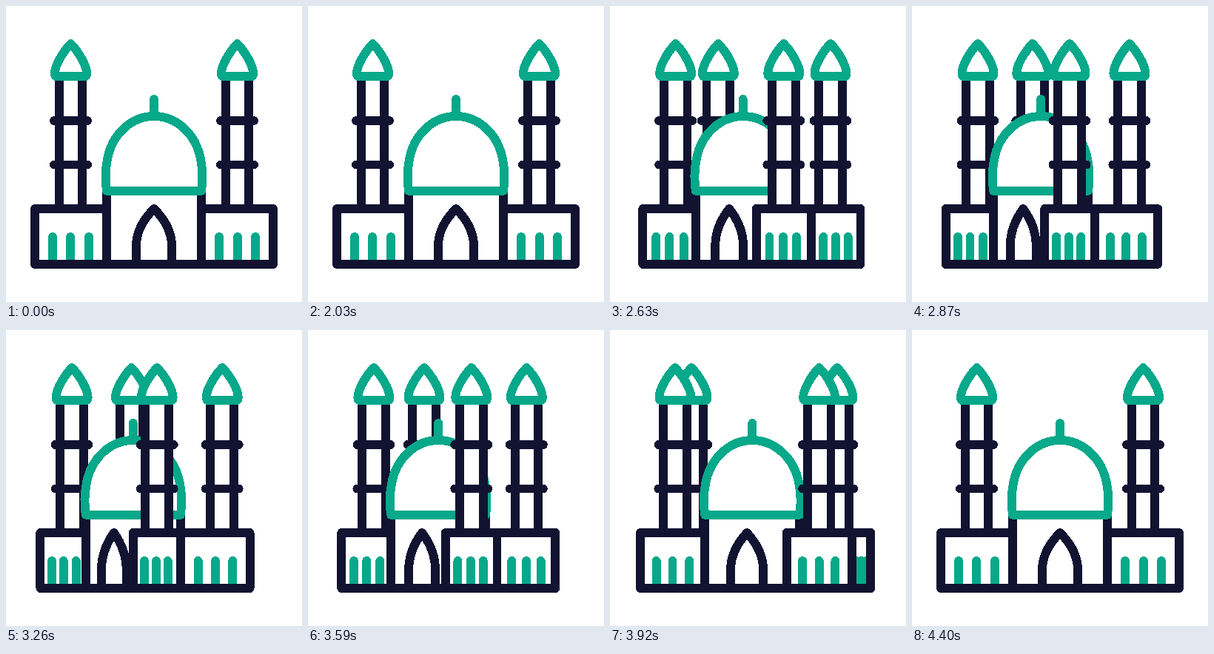
These frames come from a looping animation (400 px wide and 400 px high, 4.43 s). An HTML page:

```html
<!DOCTYPE html>
<html lang="en">
<head>
<meta charset="utf-8">
<title>Turning mosque</title>
<style>
html, body { margin: 0; width: 100%; height: 100%; overflow: hidden; background: #fff; }
svg { display: block; width: 100vw; height: 100vh; shape-rendering: crispEdges; }
path { stroke-width: 11.9; stroke-linecap: round; stroke-linejoin: round; fill: none; }
.dark { stroke: #121331; }
.green { stroke: #08a88a; }
.solid { fill: #fff; }
.blank { fill: #fff; stroke: none; }
</style>
</head>
<body>
<svg id="stage" viewBox="0 0 400 400"></svg>
<script>
const LOOP = 4430, START = 2030, HALF = 1185, STEP = 30, PEAK = 108.5;
const NS = "http://www.w3.org/2000/svg";
const stage = document.getElementById("stage");

function add(parent, tag, attrs) {
  const el = document.createElementNS(NS, tag);
  for (const k in attrs) el.setAttribute(k, attrs[k]);
  parent.appendChild(el);
  return el;
}
const path = (parent, cls, d = "") => add(parent, "path", { class: cls, d });
const move = (el, x) => el.setAttribute("transform", `translate(${x.toFixed(2)} 0)`);
const draw = (el, d) => el.setAttribute("d", d);

// Towers are built around x = 0
function tower() {
  const g = add(stage, "g", {});
  path(g, "blank", "M-15.8 95H15.8V274H-15.8Z");
  path(g, "dark", "M-15.8 97V274M15.8 97V274M-22.5 155H22.5M-22.5 214.5H22.5");
  path(g, "green solid", "M0 51C-10 61 -21.5 80 -21.5 91Q-21.5 95 -19.5 95H19.5Q21.5 95 21.5 91C21.5 80 10 61 0 51Z");
  return g;
}

function block() {
  const fill = path(stage, "blank"), bars = path(stage, "green"), frame = path(stage, "dark");
  return (left, right, xs) => {
    const box = `M${left} 274H${right}V349H${left}Z`;
    draw(fill, box);
    draw(bars, xs.map(x => `M${x} 312V349`).join(""));
    draw(frame, box);
  };
}

const backLeft = tower(), backRight = tower(), frontLeft = tower();

const hall = add(stage, "g", {});
path(hall, "blank", "M-64 250H64V349H-64Z");
path(hall, "dark", "M-64 250V349M64 250V349");
path(hall, "green", "M0 126V147");
path(hall, "green solid", "M-64 249.7C-65.8 238 -65.8 222 -63.2 208C-57 173 -30.5 149 0 149C30.5 149 57 173 63.2 208C65.8 222 65.8 238 64 249.7Z");

const sideBlock = block();
const frontRight = tower();
const leftBlock = block(), rightBlock = block();
const base = path(stage, "dark"), door = path(stage, "dark");

function bezier(a, b, x) {
  let lo = 0, hi = 1;
  for (let i = 0; i < 30; i++) {
    const u = (lo + hi) / 2, v = 1 - u;
    if (3 * a * u * v * v + 3 * b * u * u * v + u * u * u < x) lo = u; else hi = u;
  }
  return lo * lo * (3 - 2 * lo);
}

function turn(ms) {
  if (ms < START) return 0;
  const t = Math.floor((ms - START) / STEP) * STEP;
  if (t <= 0 || t >= 2 * HALF) return 0;
  return PEAK * (t < HALF
    ? bezier(0.322, 0.352, t / HALF)
    : 1 - bezier(0.583, 0.4, t / HALF - 1));
}

function render(ms) {
  const p = turn(ms);
  const at = (x, k) => +(x + k * p).toFixed(2);

  const hidden = p < 0.05 ? "none" : "inline";
  backLeft.style.display = backRight.style.display = hidden;
  move(backLeft, at(87.5, 0.757));
  move(backRight, at(312.5, -0.187));
  move(frontLeft, at(87.5, 0.015));
  move(frontRight, at(312.5, -1));
  move(hall, at(200, -0.26));

  const left = at(39, 0.068), corner = at(361, -1.15), right = at(361, -0.29);
  const sideBars = p < 2 ? [] : [0.25, 0.5, 0.75].map(f => corner + (right - corner) * f);
  sideBlock(corner, right, sideBars);
  leftBlock(left, at(136, -0.26), [at(63, -0.01), at(87, -0.085), at(112, -0.16)]);
  rightBlock(at(264, -0.852), corner, [at(288, -0.933), at(313, -1.015), at(337, -1.092)]);
  draw(base, `M${left} 349H${right}`);

  const c = at(200, -0.5), w = at(24, -0.066);
  draw(door, `M${c - w} 349V324C${c - w} 304 ${c - w * 0.5} 286 ${c} 274C${c + w * 0.5} 286 ${c + w} 304 ${c + w} 324V349`);
}

let begin = null;
function tick(now) {
  if (begin === null) begin = now;
  render((now - begin) % LOOP);
  requestAnimationFrame(tick);
}
render(0);
requestAnimationFrame(tick);
</script>
</body>
</html>
```
